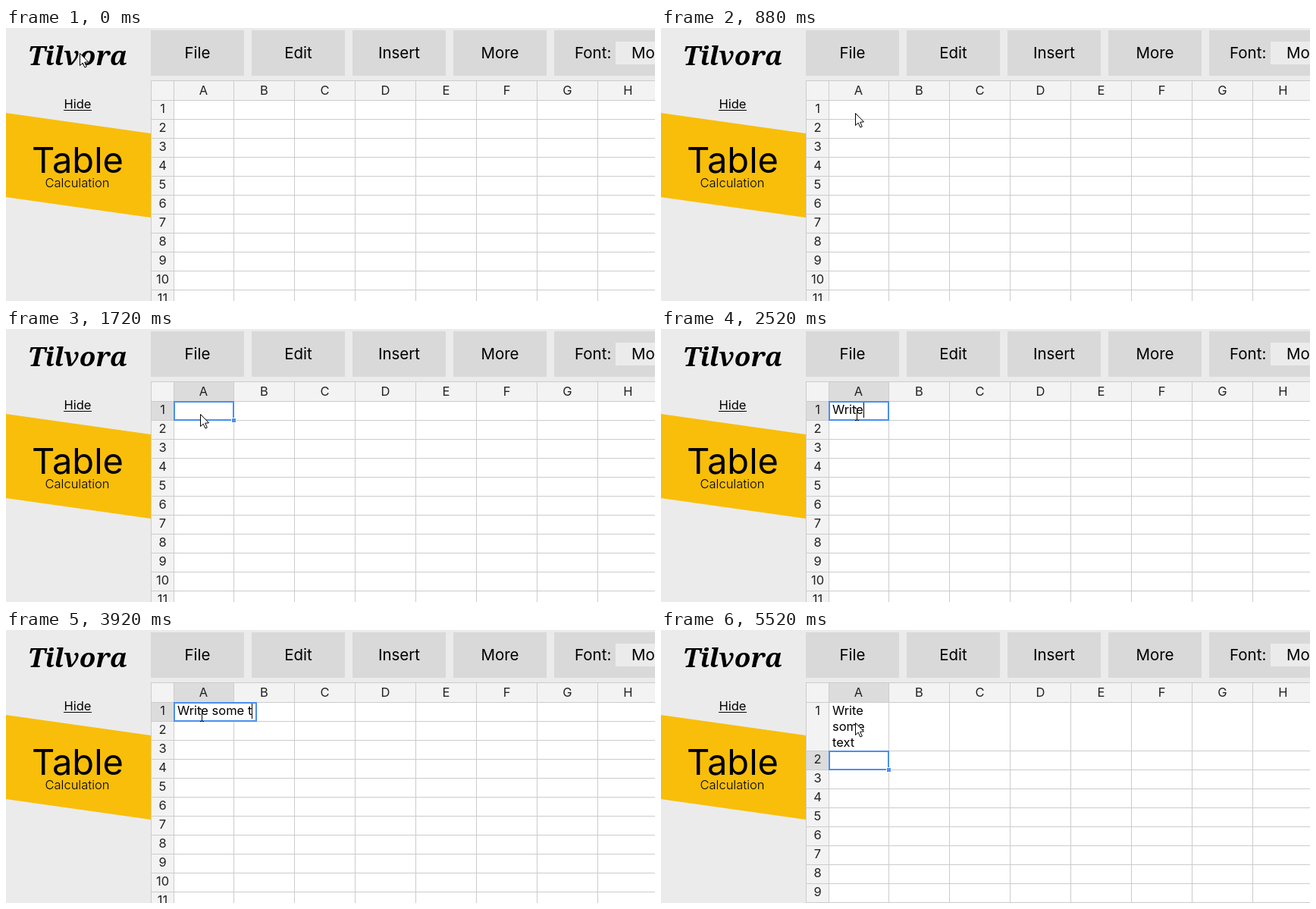
Write an HTML page with a canvas that moves like this. It is 856 px wide and 360 px high and loops after 6 s.

```html
<!DOCTYPE html>
<html lang="en">
<head>
<meta charset="utf-8">
<title>Table calculation</title>
<style>
  html, body { margin: 0; width: 100%; height: 100%; overflow: hidden; background: #ebebeb; }
  canvas { display: block; }
</style>
</head>
<body>
<canvas id="stage" width="856" height="360"></canvas>
<script>
const ctx = document.getElementById('stage').getContext('2d');
const LOOP = 6000;
const SELECT = 1240, ENTER = 5400, POINTER_BACK = 5520;
const PHRASE = 'Write some text';
const RESIZE_DELAY = 80;   // the editor box grows shortly after each key
const SANS = 'Inter, "Open Sans", sans-serif';
const BODY = `16.5px ${SANS}`;
const BLUE = '#4b8ff0', LINE = '#cccccc', HEAD = '#f3f3f3', ACTIVE = '#dcdcdc';

function rect(x, y, w, h, color) {
  ctx.fillStyle = color;
  ctx.fillRect(x, y, w, h);
}

function text(value, x, y, font = BODY, align = 'center', color = '#000') {
  ctx.font = font;
  ctx.textAlign = align;
  ctx.fillStyle = color;
  ctx.fillText(value, x, y);
}

function shape(points, fill, stroke) {
  ctx.beginPath();
  points.forEach(([x, y]) => ctx.lineTo(x, y));
  ctx.closePath();
  ctx.fillStyle = fill;
  ctx.fill();
  if (stroke) {
    ctx.strokeStyle = stroke;
    ctx.lineWidth = 1;
    ctx.stroke();
  }
}

function frame(x, y, w, h) {
  ctx.strokeStyle = BLUE;
  ctx.lineWidth = 2;
  ctx.strokeRect(x + 1, y + 1, w - 2, h - 2);
}

function textWidth(value) {
  ctx.font = BODY;
  return ctx.measureText(value).width;
}

function drawSidebar() {
  text('Tilvora', 94.5, 49, 'italic bold 35px "Noto Serif", serif');
  text('Hide', 94.5, 106);
  rect(76, 108, 37, 1, '#000');
  shape([[0, 112], [191, 139], [191, 250], [0, 223]], '#f8be0a');
  text('Table', 94.5, 191, `47px ${SANS}`);
  text('Calculation', 94, 210, `300 16.5px ${SANS}`);
}

function drawToolbar() {
  const font = `20.5px ${SANS}`;
  ['File', 'Edit', 'Insert', 'More'].forEach((label, i) => {
    rect(191 + i * 133, 3, 123, 60, '#d9d9d9');
    text(label, 252.5 + i * 133, 40, font);
  });
  rect(723, 3, 133, 60, '#d9d9d9');
  text('Font:', 750, 40, font, 'left');
  rect(804, 18, 52, 30, '#ebebeb');
  text('Mo', 825, 40, font, 'left');
}

function drawGrid(activeRow, firstRowBottom) {
  rect(191, 69, 665, 291, '#fff');
  rect(191, 69, 665, 26, HEAD);
  rect(191, 69, 30, 291, HEAD);
  if (activeRow) rect(222, 70, 78, 25, ACTIVE);

  for (let row = 1, top = 95; top < 360; row++) {
    const bottom = row === 1 ? firstRowBottom : top + 25;
    if (row === activeRow) rect(192, top + 1, 29, bottom - top - 1, ACTIVE);
    text(row, 206.5, top + 17, BODY, 'center', '#222');
    rect(191, top, 665, 1, LINE);
    top = bottom;
  }
  rect(191, 69, 665, 1, LINE);
  rect(191, 69, 1, 291, LINE);
  rect(221, 69, 1, 291, LINE);
  [...'ABCDEFGH'].forEach((letter, i) => {
    text(letter, 260.5 + i * 80, 88, BODY, 'center', '#222');
    rect(300 + i * 80, 69, 1, 291, LINE);
  });
}

function drawSelection(top) {
  frame(221, top, 80, 26);
  rect(297, top + 22, 7, 7, '#fff');
  rect(298, top + 23, 5, 5, BLUE);
}

// Start time of the nth key: the first word is typed faster than the rest.
const keyTime = n => n <= 5 ? 1760 + (n - 1) * 150 : 2540 + (n - 6) * 205;

function typedCount(t) {
  let n = 0;
  while (n < PHRASE.length && t >= keyTime(n + 1)) n++;
  return n;
}

const editorWidth = value => Math.max(80, Math.round(textWidth(value)) + 12);

function drawEditor(t, count) {
  const typed = PHRASE.slice(0, count);
  const sinceKey = t - keyTime(count);
  const fitted = sinceKey < RESIZE_DELAY ? typed.slice(0, -1) : typed;
  const width = editorWidth(fitted);
  const wraps = textWidth(typed.trimEnd()) + 9 > width;
  const visible = wraps ? typed.split(' ').pop() : typed;
  const shift = wraps ? 4 : 0;

  rect(221, 95, width, 26, '#fff');
  text(visible, 226, 112 + shift, BODY, 'left');
  if (sinceKey % 1000 < 500) {
    rect(Math.round(226 + textWidth(visible)), 97 + shift, 1, 20, '#000');
  }
  frame(221, 95, width, 26);
}

function drawArrow(x, y) {
  const outline = [[0, 0], [0, 16], [3.7, 12.6], [6.4, 18.5], [8.8, 17.5], [6.2, 11.7], [11, 11.3]];
  shape(outline.map(([dx, dy]) => [x + 0.5 + dx, y + 0.5 + dy]), '#fff', '#000');
}

function drawBeam(x, y) {
  rect(x, y - 7, 1, 15, '#000');
  for (const end of [y - 8, y + 8]) {
    rect(x - 2, end, 2, 1, '#000');
    rect(x + 1, end, 2, 1, '#000');
  }
}

function drawPointer(t, editing) {
  if (t >= POINTER_BACK) return drawArrow(256, 122);
  if (editing || t >= ENTER) return drawBeam(258, 112);
  const p = Math.min(1, Math.max(0, (t - 120) / 640));
  const eased = p * p * (3 - 2 * p);
  drawArrow(97 + 159 * eased, 33 + 79 * eased);
}

function draw(t) {
  const done = t >= ENTER;
  const count = done ? 0 : typedCount(t);
  rect(0, 0, 856, 360, '#ebebeb');
  drawSidebar();
  drawToolbar();
  drawGrid(done ? 2 : t >= SELECT ? 1 : 0, done ? 159 : 120);
  if (done) {
    PHRASE.split(' ').forEach((word, i) => text(word, 226, 112 + i * 21, BODY, 'left'));
    drawSelection(159);
  } else if (count) {
    drawEditor(t, count);
  } else if (t >= SELECT) {
    drawSelection(95);
  }
  drawPointer(t, count > 0);
}

const start = performance.now();
function tick() {
  draw((performance.now() - start) % LOOP);
  requestAnimationFrame(tick);
}
tick();
</script>
</body>
</html>
```
